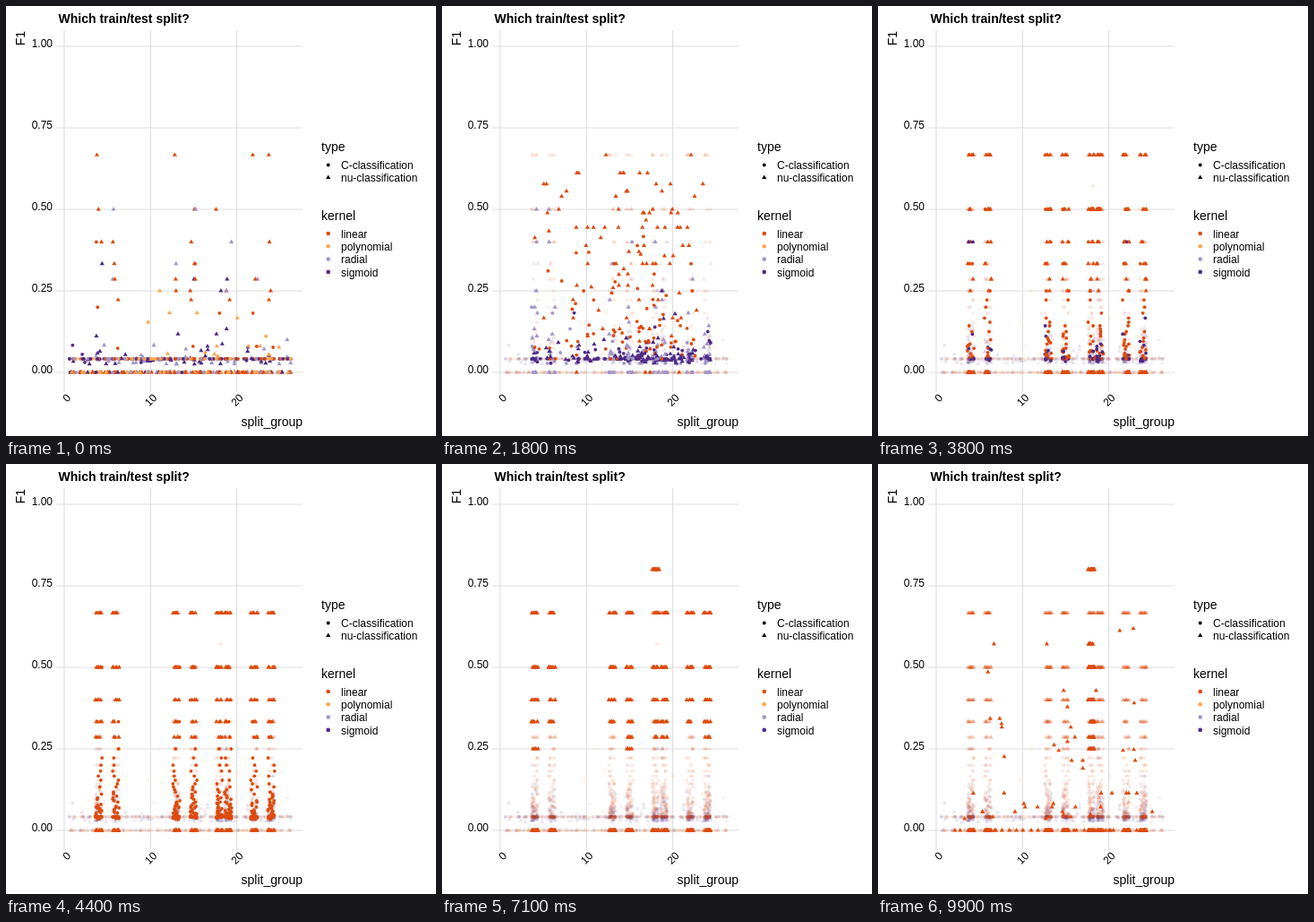
Animation of 480x480 px, one loop 10 s. Source, as an HTML page with a canvas:

```html
<!DOCTYPE html>
<html lang="en">
<head>
<meta charset="utf-8">
<title>Which train/test split?</title>
<style>
  html, body { margin: 0; width: 100%; height: 100%; overflow: hidden; background: #fff; }
  svg, canvas { position: absolute; left: 0; top: 0; width: 480px; height: 480px; }
  text { font-family: "Liberation Sans", Arial, sans-serif; fill: #000; }
</style>
</head>
<body>
<svg id="chart" viewBox="0 0 480 480"></svg>
<canvas id="dots"></canvas>
<script>
const COLORS = { l: '#dd4b0c', p: '#fda64d', r: '#a196c8', s: '#4d2a86' };
const SHADOW_ALPHA = 0.12;
const RADIUS = 1.9;
const FRAME_MS = 100, FRAMES = 100;

const px = v => 65 + 9.63 * v;
const py = v => 409 - 364 * v;

// ---- Static chart -------------------------------------------------------
const chart = document.getElementById('chart');

function el(tag, attrs, content) {
  const node = document.createElementNS('http://www.w3.org/2000/svg', tag);
  for (const name in attrs) node.setAttribute(name, attrs[name]);
  if (content) node.textContent = content;
  chart.appendChild(node);
}
const label = (x, y, size, content, extra) =>
  el('text', { x, y, 'font-size': size, ...extra }, content);
const line = (x1, y1, x2, y2) =>
  el('line', { x1, y1, x2, y2, stroke: '#dedede', 'stroke-width': 1.1 });
const disc = (cy, r, fill) => el('circle', { cx: 359.7, cy, r, fill });
const END = { 'text-anchor': 'end' };

for (let v = 0; v <= 1; v += 0.25) {
  line(56, py(v), 331, py(v));
  label(52, py(v) + 1, 12, v.toFixed(2), END);
}
for (let v = 0; v <= 20; v += 10) {
  line(px(v), 27, px(v), 431);
  const x = px(v) + 8, y = 438;
  label(x, y, 12, String(v), { ...END, transform: `rotate(-45 ${x} ${y})` });
}
label(58.5, 19, 14, 'Which train/test split?', { 'font-weight': 'bold' });
label(331, 469, 14, 'split_group', END);
label(21, 28, 14, 'F1', { ...END, transform: 'rotate(-90 21 28)' });

label(352, 162, 14, 'type');
disc(177.5, RADIUS, '#000');
el('path', { d: 'M359.7 188.6l2.6 4.4h-5.2z' });
label(374, 182, 12, 'C-classification');
label(374, 196, 12, 'nu-classification');
label(352, 239, 14, 'kernel');
['linear', 'polynomial', 'radial', 'sigmoid'].forEach((name, i) => {
  disc(254 + 14.3 * i, 2.3, COLORS[name[0]]);
  label(374, 258.6 + 14.3 * i, 12, name);
});

// ---- Data ---------------------------------------------------------------
// A kind is kernel initial + shape (c = circle, t = triangle).
// Scores follow F1 = 2 / k; an infinite k is a score of zero.
let seed = 20231;
function random() {
  seed = (seed + 0x6D2B79F5) | 0;
  let t = Math.imul(seed ^ (seed >>> 15), 1 | seed);
  t = (t + Math.imul(t ^ (t >>> 7), 61 | t)) ^ t;
  return ((t ^ (t >>> 14)) >>> 0) / 4294967296;
}

const ALL = Array.from({ length: 26 }, (_, i) => i + 1);
const LATE = ALL.slice(9);
const BEST = [4, 6, 13, 15, 18, 19, 22, 24];
const TOP = [18];
const BASE = 48, ZERO = Infinity;

function buildState(define) {
  const points = [];

  // About n points per group at score 2 / k, with horizontal jitter.
  function level(kind, groups, k, n) {
    for (const group of groups)
      for (let i = Math.floor(n + random()); i > 0; i--)
        points.push({ kind, x: px(group + random() * 0.8 - 0.4), y: py(2 / k) });
  }
  // Successive levels, each holding a fixed share of the one above.
  function ladder(kind, groups, first, last, n, decay = 1) {
    for (let k = first; k <= last; k++, n *= decay) level(kind, groups, k, n);
  }

  define(level, ladder);
  for (let i = points.length - 1; i > 0; i--) {
    const j = Math.floor(random() * (i + 1));
    [points[i], points[j]] = [points[j], points[i]];
  }
  const byKind = {};
  for (const p of points) (byKind[p.kind] ??= []).push(p);
  return { points, byKind };
}

const states = [
  (level, ladder) => {
    for (const kernel of 'lprs') {
      level(kernel + 'c', ALL, BASE, 2);
      level(kernel + 'c', ALL, ZERO, 0.4);
      level(kernel + 't', ALL, ZERO, 'lp'.includes(kernel) ? 2 : 0.8);
    }
    ladder('lt', BEST, 3, 9, 0.42);
    ladder('rt', BEST, 3, 9, 0.18);
    ladder('st', BEST, 5, 18, 0.1);
    ladder('lc', BEST, 5, 30, 0.05);
    ladder('pt', LATE, 8, 40, 0.025);
    ladder('pc', LATE, 8, 40, 0.012);
    ladder('st', ALL, 20, 80, 0.022);
    ladder('rt', ALL, 20, 80, 0.016);
    ladder('sc', ALL, 20, 80, 0.007);
  },
  (level, ladder) => {
    ladder('lt', BEST, 3, 9, 3, 0.75);
    level('lt', BEST, ZERO, 2);
    ladder('lc', BEST, 4, 24, 0.5, 0.96);
    level('lc', BEST, BASE, 2);
    ladder('rt', BEST, 3, 50, 0.2, 0.98);
    level('rt', BEST, ZERO, 2);
    ladder('rc', BEST, 5, 60, 0.05);
    level('rc', BEST, BASE, 6);
    level('rc', BEST, ZERO, 2);
    ladder('st', BEST, 4, 18, 0.08);
    ladder('st', BEST, 18, 70, 0.18);
    ladder('sc', BEST, 6, 70, 0.06);
    level('sc', BEST, BASE, 7);
  },
  (level, ladder) => {
    ladder('lt', BEST, 3, 7, 4.5, 0.8);
    ladder('lt', [18, 19], 3, 4, 4);
    level('lt', BEST, ZERO, 8);
    ladder('lc', [4, 13, 18, 19, 24], 6, 30, 0.36);
    level('lc', TOP, 3.5, 1);
    level('lc', BEST, BASE, 3);
    ladder('st', BEST, 26, 70, 0.22);
    ladder('sc', BEST, 3, 6, 0.1);
    ladder('sc', BEST, 14, 60, 0.08);
    level('sc', BEST, BASE, 5);
    level('rc', BEST, ZERO, 3);
  },
  (level, ladder) => {
    ladder('lt', BEST, 3, 8, 4.5, 0.75);
    level('lt', [18, 19], 4, 4);
    level('lt', BEST, ZERO, 9);
    ladder('lc', BEST, 4, 48, 0.6, 0.975);
    level('lc', BEST, BASE, 3);
    ladder('sc', BEST, 12, 60, 0.1);
    level('sc', BEST, BASE, 3);
    level('sc', [4, 22], 5, 2);
  },
  (level, ladder) => {
    ladder('lt', BEST, 3, 7, 6, 0.75);
    level('lt', BEST, ZERO, 8);
    ladder('lc', BEST, 4, 60, 1, 0.98);
    level('lc', BEST, BASE, 9);
  },
  (level, ladder) => {
    level('lt', TOP, 2.5, 3);
    ladder('lt', BEST, 3, 5, 6, 0.5);
    level('lt', BEST, ZERO, 9);
  },
  (level, ladder) => {
    level('lt', TOP, 2.5, 14);
    ladder('lt', BEST, 3, 6, 7, 0.9);
    level('lt', [15, 18, 19, 24], 7, 5);
    level('lt', [4, 15], 8, 4);
    level('lt', BEST, ZERO, 12);
  },
  (level, ladder) => {
    level('lt', TOP, 2.5, 16);
    ladder('lt', [13, 18, 19], 4, 6, 8, 0.75);
    level('lt', BEST, ZERO, 12);
  },
  (level, ladder) => {
    level('lt', TOP, 2.5, 20);
    level('lt', TOP, 3.5, 12);
    ladder('lt', TOP, 4, 8, 22, 0.85);
    level('lt', BEST, ZERO, 14);
  }
].map(buildState);

// ---- Timing: each state rests for 2/5 of its cycle, then moves on -------
const CYCLE = FRAMES / states.length;
const OPENING_HOLD = 3;
const moveStart = i => (i ? Math.round(CYCLE * (i + 0.4)) : OPENING_HOLD);
const moveEnd = i => Math.round(CYCLE * (i + 1));

// ---- Animation ----------------------------------------------------------
const canvas = document.getElementById('dots');
const ctx = canvas.getContext('2d');
const ratio = window.devicePixelRatio || 1;
canvas.width = canvas.height = 480 * ratio;
ctx.scale(ratio, ratio);

function drawPoint(kind, x, y) {
  ctx.fillStyle = COLORS[kind[0]];
  ctx.beginPath();
  if (kind[1] === 'c') {
    ctx.arc(x, y, RADIUS, 0, 2 * Math.PI);
  } else {
    const r = RADIUS * 1.555;
    ctx.moveTo(x, y - r);
    ctx.lineTo(x + r * 0.866, y + r / 2);
    ctx.lineTo(x - r * 0.866, y + r / 2);
  }
  ctx.fill();
}

function drawState(from, to, progress) {
  const used = {};
  for (const p of from.points) {
    const index = used[p.kind] = (used[p.kind] ?? -1) + 1;
    // Points without a partner stay until the move is over.
    const q = to.byKind[p.kind]?.[index] ?? p;
    drawPoint(p.kind, p.x + (q.x - p.x) * progress, p.y + (q.y - p.y) * progress);
  }
}

function render(frame) {
  const i = states.findIndex((_, n) => frame < moveEnd(n));
  const progress = Math.max(0, (frame - moveStart(i)) / (moveEnd(i) - moveStart(i)));
  ctx.clearRect(0, 0, 480, 480);
  ctx.globalAlpha = SHADOW_ALPHA;
  for (const past of states.slice(0, progress > 0 ? i + 1 : i))
    for (const p of past.points) drawPoint(p.kind, p.x, p.y);
  ctx.globalAlpha = 1;
  drawState(states[i], states[(i + 1) % states.length], progress);
}

let shown = -1;
const began = performance.now();
function tick() {
  const frame = Math.floor((performance.now() - began) / FRAME_MS) % FRAMES;
  if (frame !== shown) render(shown = frame);
  requestAnimationFrame(tick);
}
tick();
</script>
</body>
</html>
```
